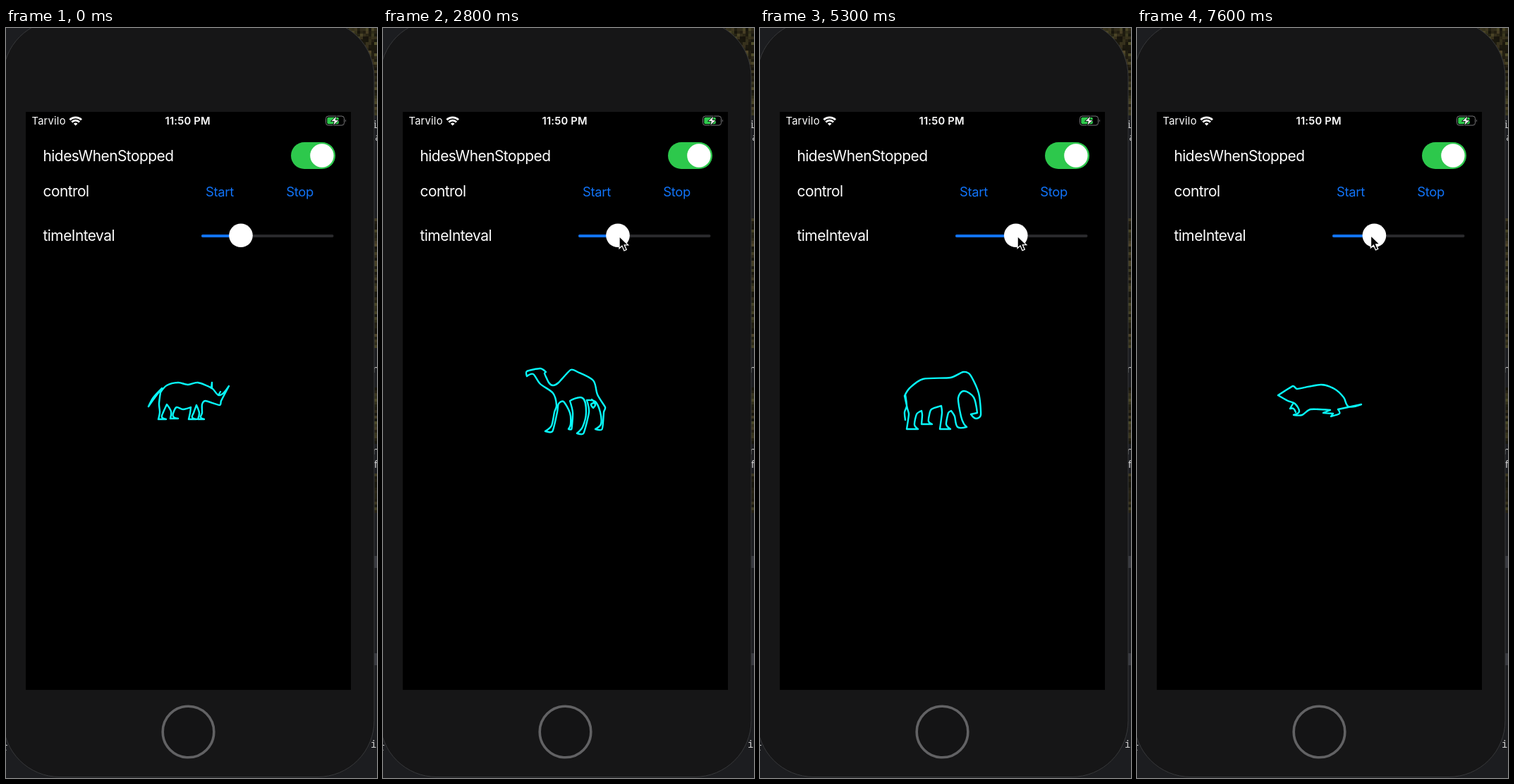
Write an HTML page that moves like this. It is 526x1064 px and loops after 8000 ms.

```html
<!DOCTYPE html>
<html lang="en">
<head>
<meta charset="utf-8">
<title>Loading indicator</title>
<style>
html, body { margin: 0; width: 100%; height: 100%; overflow: hidden; background: #000; }
svg { display: block; width: 526px; height: 1064px; font-family: Inter, "Liberation Sans", sans-serif; }
.label { font-size: 20.9px; letter-spacing: -.52px; fill: #fff; }
.button { font-size: 18.4px; letter-spacing: -.3px; fill: #1173f7; }
.status { font-size: 14.75px; letter-spacing: .2px; fill: #fff; }
#code { font: 14px "Noto Sans Mono", monospace; fill: #d0d0d0; }
</style>
</head>
<body>
<svg viewBox="0 0 526 1064">
  <!-- desktop -->
  <rect width="526" height="1064" fill="#1c1d20"/>
  <g id="leaves"></g>
  <rect x="515" y="749" width="11" height="17" fill="#393a40"/>
  <rect x="515" y="887" width="11" height="17" fill="#393a40"/>
  <g id="code">
    <text x="519" y="142">i</text><text x="523" y="160">a</text>
    <text x="520" y="489">n</text><text x="520" y="605">n</text>
    <text x="520" y="624">f</text><text x="517" y="1021">i</text>
    <text x="-6" y="1025">r</text>
  </g>

  <!-- phone -->
  <rect x="-4" y="-11" width="526" height="1073.5" rx="80" fill="#161617" stroke="#37383a"/>
  <rect x="28" y="119" width="461" height="820"/>
  <circle cx="258.5" cy="998.5" r="36.3" fill="#141415" stroke="#626264" stroke-width="3.6"/>

  <!-- status bar -->
  <text class="status" x="36.5" y="137">Tarvilo</text>
  <text class="status" x="225.5" y="137" font-weight="600">11:50 PM</text>
  <g fill="none" stroke="#fff" stroke-width="2.8">
    <path d="M90.4 130.2A12 12 0 0 1 107 130.2M93.3 133.4A7.6 7.6 0 0 1 104.1 133.4"/>
    <path d="M98.7 138.6L95.9 135.8A4 4 0 0 1 101.5 135.8Z" fill="#fff" stroke="none"/>
  </g>
  <rect x="453.5" y="125" width="26" height="13" rx="3.5" fill="none" stroke="#77777a"/>
  <path d="M481 129.5q2 2 0 4z" fill="#77777a"/>
  <rect x="455.3" y="126.8" width="16.5" height="9.4" rx="2" fill="#2fc94d"/>
  <path d="M469 124.5L460.5 132.4H465.3L463.6 138.7L472.3 130.5H467.3Z" fill="#fff" stroke="#000" stroke-width=".9"/>

  <!-- controls -->
  <text class="label" x="52.5" y="188.5">hidesWhenStopped</text>
  <text class="label" x="52.5" y="239">control</text>
  <text class="label" x="52.5" y="301.5">timeInteval</text>
  <text class="button" x="283" y="238.5">Start</text>
  <text class="button" x="397.3" y="238.5">Stop</text>
  <rect x="404" y="162" width="63" height="38" rx="19" fill="#2dc84c"/>
  <circle cx="447.9" cy="181" r="16.7" fill="#fff"/>
  <rect x="277" y="293" width="187.5" height="4" rx="2" fill="#29292c"/>
  <rect id="fill" x="277" y="293" height="4" rx="2" fill="#1173f7"/>
  <circle id="thumb" cy="294.3" r="16.8" fill="#fff"/>

  <path id="animal" fill="none" stroke="#08f8fa" stroke-width="2.4" stroke-linecap="round" stroke-linejoin="round"/>
  <path id="cursor" d="M0 0V17.2L3.9 13.5L6.9 20.4L10.2 19L7.2 12.3H12.6Z" stroke="#fff" stroke-width="1.3"/>
</svg>
<script>
const LOOP = 8000, TRAVEL = 600;
const $ = id => document.getElementById(id);

// A leg from its left edge over the foot to its right edge; the sign of toe is where it points.
function leg(x, top, width, lean, ground, toe) {
  const foot = x + lean, ankle = ground - (ground - top) * .3;
  const sole = toe > 0
    ? [[foot, ground], [foot + toe, ground], [foot + width, ankle]]
    : [[foot, ankle], [foot + toe, ground], [foot + width / 3, ground]];
  return [[x, top], ...sole, [x + width, top]].join(' ');
}

// Key points, underside first, then the back; "|" starts a new stroke.
const outlines = {
  rhino: `219,517 217,533 ${leg(218, 545, 5, -2, 555, 11)} 228,534 ${leg(234, 544, 4, -1, 554, 11)}
    242,538 251,541 262,538 ${leg(261, 546, 5, -2, 555, 11)} 270,535 ${leg(274, 546, 4, -2, 555, 9)}
    278,534 283,529 303,535 305,529 316,508 303,521 292,511 272,503 258,506 244,503 228,507 219,517
    |291,511 292,503 292,511|301,521 304,516|202,537 209,524 221,511 209,527 202,537`,
  mole: `200,521 214,529 224,533 230,544 222,549 234,549 246,541 274,542 264,546 278,547 275,551 287,547
    285,541 318,534 300,537 293,524 280,512 261,506 227,512 221,508 200,521|221,533 217,540 222,540 225,545`,
  camel: `204,494 213,491 223,505 241,518 246,535 ${leg(243, 545, 4, -4, 572, -9)} 249,533 256,530
    ${leg(265, 546, 4, 1, 569, -3)} 265,529 283,525 ${leg(288, 545, 4, -5, 575, -8)} 289,528 301,530
    ${leg(308, 545, 5, 1, 569, -8)} 315,538 304,520 298,500 276,488 266,485 249,503 241,507 235,503
    229,490 231,488 223,483 204,487 204,494|296,527 299,531 295,534 298,539 301,535 299,531`,
  elephant: `205,522 209,540 ${leg(211, 548, 11, -3, 569, 16)} 229,543 ${leg(230, 549, 10, -1, 562, 15)}
    243,541 257,536 ${leg(258, 546, 9, -3, 569, 15)} 271,543 ${leg(276, 551, 9, 4, 566, 13)} 281,525
    289,515 303,524 308,546 299,548 306,554 313,549 310,518 298,492 288,488 270,496 231,498 212,511
    205,522|206,556 205,545 208,536 206,520`,
  deer: `263,494 285,498 276,502 275,509 284,530 296,527 293,533 294,540 288,545 289,533 247,547 229,566
    221,584 227,566 231,538 254,531 264,522 267,500 263,494|231,538 225,536 225,532 231,538
    |267,494 264,486 277,479|264,486 262,483|268,484 267,478|271,482 273,475`
};

// Catmull-Rom curve; sharp turns stay corners.
function curve(text) {
  const p = text.trim().split(/\s+/).map(s => s.split(',').map(Number));
  const tangent = i => {
    const a = p[i - 1], b = p[i], c = p[i + 1];
    if (!a || !c) return [0, 0];
    const u = [b[0] - a[0], b[1] - a[1]], v = [c[0] - b[0], c[1] - b[1]];
    const scale = Math.min(Math.hypot(...u), Math.hypot(...v)) / Math.hypot(u[0] + v[0], u[1] + v[1]) / 3;
    return u[0] * v[0] + u[1] * v[1] < 0 ? [0, 0] : [(u[0] + v[0]) * scale, (u[1] + v[1]) * scale];
  };
  let d = 'M' + p[0];
  for (let i = 1; i < p.length; i++) {
    const a = p[i - 1], b = p[i], m = tangent(i - 1), n = tangent(i);
    d += `C${a[0] + m[0]},${a[1] + m[1]} ${b[0] - n[0]},${b[1] - n[1]} ${b}`;
  }
  return d;
}

const animals = ['rhino', 'mole', 'camel', 'elephant', 'deer'];
const paths = animals.map(name => outlines[name].split('|').map(curve).join(''));

// Dark foliage behind the right edge of the phone.
let seed = 7;
const random = () => (seed = seed * 16807 % 2147483647) / 2147483647;
function foliage(x, top, bottom) {
  let s = '';
  for (let y = top; y < bottom; y += 4)
    for (let cx = x; cx < 526; cx += 4) {
      const light = 7 + 17 * random() ** 2;
      s += `<rect x="${cx}" y="${y}" width="4" height="4" fill="hsl(${42 + 14 * random()} 32% ${light}%)"/>`;
    }
  return s;
}
$('leaves').innerHTML = foliage(470, 0, 124) + foliage(518, 270, 454) + foliage(518, 510, 588) + foliage(518, 632, 688);

// The indicator pauses while the slider is dragged.
const switches = [1200, 2400, 4800, 6300, 6700, 7000];

// Cursor stops: arrival time, x, y.
const stops = [
  [0, 540, 390], [1500, 307, 231], [2650, 335, 295.5], [3600, 394.5, 295.5],
  [5700, 282, 294.5], [6600, 289, 294], [7500, 331.5, 294.5]
];

function cursorAt(t) {
  const next = stops.findIndex(s => s[0] > t);
  if (next < 0) return stops[stops.length - 1].slice(1);
  const a = stops[next - 1], b = stops[next];
  const k = Math.max(0, 1 - (b[0] - t) / TRAVEL), e = k * k * (3 - 2 * k);
  return [1, 2].map(j => a[j] + (b[j] - a[j]) * e);
}

function thumbAt(t, x) {
  if (t < 3000) return 333;
  return t < 6600 ? Math.max(293.7, x - 2.3) : x + 4.9;
}

function draw(t) {
  const [x, y] = cursorAt(t), thumb = thumbAt(t, x);
  const count = switches.filter(s => s <= t).length;
  $('animal').setAttribute('d', paths[count % animals.length]);
  $('cursor').setAttribute('transform', `translate(${x} ${y})`);
  $('thumb').setAttribute('cx', thumb);
  $('fill').setAttribute('width', thumb - 277);
}

const start = performance.now();
function tick() {
  draw((performance.now() - start) % LOOP);
  requestAnimationFrame(tick);
}
tick();
</script>
</body>
</html>
```
